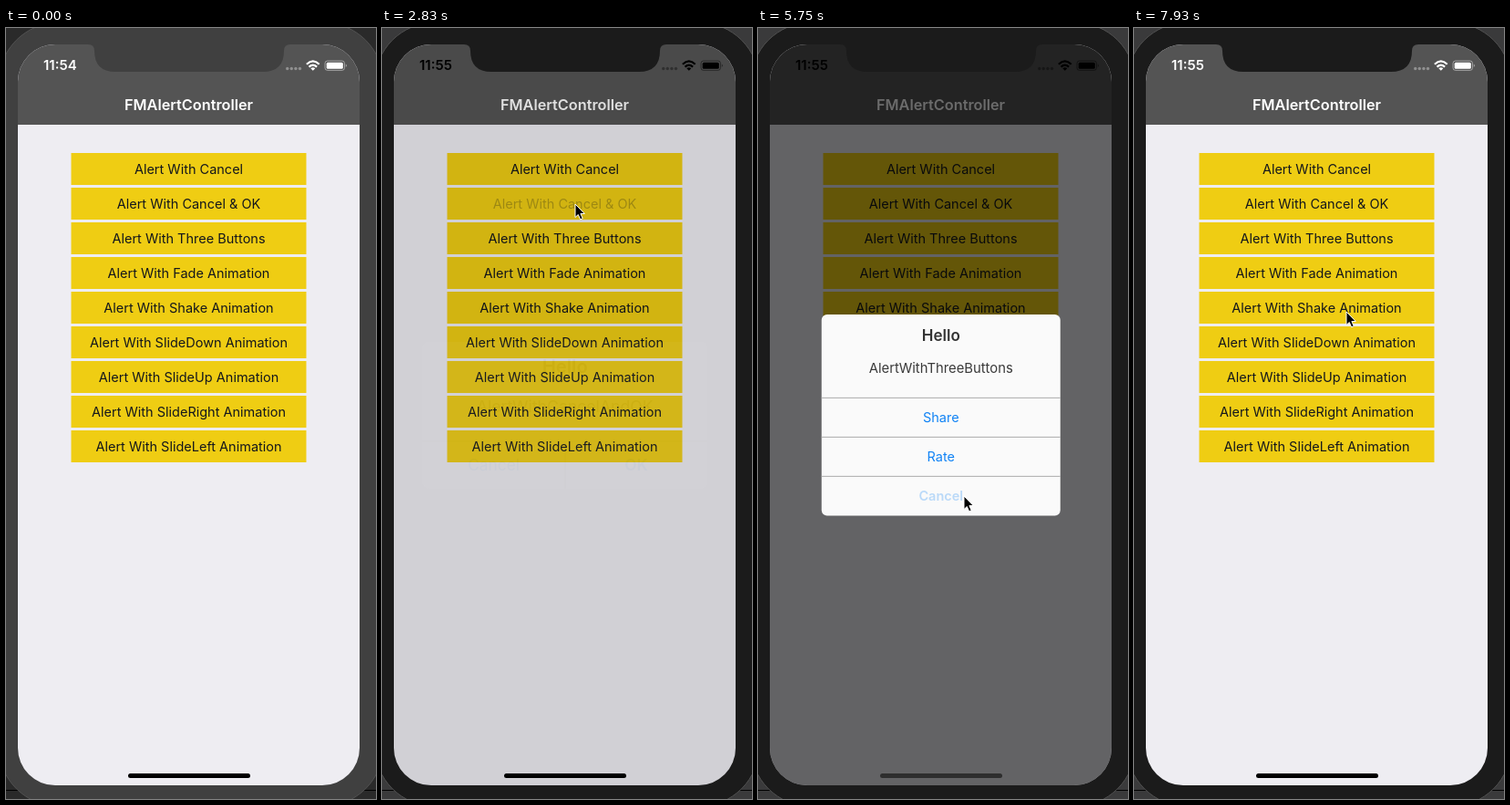
These frames come from a looping animation (406x845 px, 7.99 s). An HTML page:

```html
<!DOCTYPE html>
<html lang="en">
<head>
<meta charset="utf-8">
<title>FMAlertController</title>
<style>
  html, body { margin: 0; width: 100%; height: 100%; overflow: hidden; background: #2a2a2a; }
  svg { display: block; width: 406px; height: 845px; }
  text { font-family: Inter, Roboto, sans-serif; font-size: 14.5px; text-anchor: middle; }
  .bold { font-weight: 600; }
  .nav { font-size: 16.3px; fill: #fff; }
  .clock { font-size: 15px; text-anchor: start; }
  .title { font-size: 17px; fill: #333; }
  .message { font-size: 14.8px; fill: #3a3a3a; }
  .action { fill: #1183f5; }
</style>
</head>
<body>
<svg viewBox="0 0 406 845">
  <defs>
    <clipPath id="screen"><rect x="13" y="18" width="375" height="812" rx="41"/></clipPath>
  </defs>
  <rect id="desk" width="406" height="845"/>
  <path d="M0 835.5H406" stroke="#000"/>
  <rect id="bezel" x="-8" y="-6" width="422" height="859" rx="66" stroke="#505050"/>
  <g clip-path="url(#screen)">
    <rect x="13" y="18" width="375" height="812" fill="#eeedf2"/>
    <rect x="13" y="18" width="375" height="88" fill="#545454"/>
    <text class="nav bold" x="200.5" y="90">FMAlertController</text>
    <g id="rows"></g>
    <rect id="dim" x="13" y="18" width="375" height="812"/>
    <g id="alerts"></g>
    <rect id="home" x="134" y="817" width="134" height="5" rx="2.5"/>
  </g>
  <path id="notch" d="M90 17H312V18Q305 18 305 25Q305 48 282 48H120Q97 48 97 25Q97 18 90 18Z"/>
  <g id="status">
    <text id="clock" class="clock bold" x="41" y="46.3"></text>
    <g opacity=".35">
      <circle cx="308.7" cy="44.5" r="1.7"/><circle cx="313.3" cy="44.5" r="1.7"/>
      <circle cx="317.9" cy="44.5" r="1.7"/><circle cx="322.5" cy="44.5" r="1.7"/>
    </g>
    <g fill="none" stroke="currentColor" stroke-width="2.2">
      <path d="M329.9 39.7Q336.8 33.2 343.7 39.7"/>
      <path d="M332.5 42.6Q336.8 38.6 341.1 42.6"/>
    </g>
    <path d="M334.3 44.3Q336.8 42 339.3 44.3L336.8 46.8Z"/>
    <rect x="350" y="36" width="21.5" height="10.4" rx="2.8" fill="none" stroke="currentColor" opacity=".45"/>
    <rect x="351.7" y="37.7" width="18.1" height="7" rx="1.5"/>
    <path d="M372.8 39.5Q375 41.2 372.8 43Z" opacity=".5"/>
  </g>
  <path id="cursor" d="M0 0V14.5L3.3 11.5L5.6 16.8L8.2 15.7L5.9 10.5H10.3Z" stroke="#fff" stroke-width="1"/>
</svg>
<script>
const LOOP = 7990, CENTER_X = 200.75, CENTER_Y = 424.3, WIDTH = 262, MAX_DIM = 0.58;
const $ = id => document.getElementById(id);
const clamp = v => Math.min(1, Math.max(0, v));
const easeOut = v => 1 - (1 - clamp(v)) ** 2;
const smooth = v => v * v * (3 - 2 * v);

const labels = ['Cancel', 'Cancel &amp; OK', 'Three Buttons', 'Fade Animation', 'Shake Animation',
  'SlideDown Animation', 'SlideUp Animation', 'SlideRight Animation', 'SlideLeft Animation'];

// press: row goes down; open: alert starts; tap: action goes down; close: alert leaves
const alerts = [
  { message: 'AlertWithCancel', actions: ['Cancel'], pick: 0, press: 1240, open: 1300, tap: 2050, close: 2110, zoom: 0.2 },
  { message: 'AlertWithCancelAndOK', actions: ['Cancel', 'OK'], pick: 1, press: 2770, open: 2827, tap: 3800, close: 3865, zoom: 0.2 },
  { message: 'AlertWithThreeButtons', actions: ['Share', 'Rate', 'Cancel'], pick: 2, press: 4655, open: 4660, tap: 5700, close: 5760, zoom: 0.2 },
  { message: 'AlertWithFadeAnimation', actions: ['Cancel'], pick: 0, press: 6600, open: 6665, tap: 7300, close: 7360, zoom: 0 }
];

// time, x, y
const cursorPath = [
  [710, 388, 294], [1060, 231, 155], [1420, 231, 155], [1710, 233, 443], [1820, 233, 443], [1990, 232, 468],
  [2170, 232, 468], [2700, 212, 193], [3020, 212, 193], [3570, 236, 477],
  [3920, 236, 477], [4550, 228, 229], [4830, 228, 229], [5400, 226, 513],
  [5820, 226, 513], [6310, 233, 260], [6490, 233, 260], [6610, 235, 271],
  [6730, 235, 271], [7240, 234, 470], [7420, 234, 470], [7930, 233, 311]
];

function alertMarkup({ message, actions }) {
  const paired = actions.length === 2;
  const rowCount = paired ? 1 : actions.length;
  const height = 91.5 + 43 * rowCount;
  const left = CENTER_X - WIDTH / 2, top = CENTER_Y - height / 2;
  let body = `<rect x="${left}" y="${top}" width="${WIDTH}" height="${height}" rx="6" fill="#fafafa"/>
    <text class="title bold" x="${CENTER_X}" y="${top + 28.5}">Hello</text>
    <text class="message" x="${CENTER_X}" y="${top + 64.3}">${message}</text>`;
  for (let i = 0; i < rowCount; i++)
    body += `<path d="M${left} ${top + 91.3 + 43 * i}h${WIDTH}" stroke="#aaa"/>`;
  if (paired) body += `<path d="M${CENTER_X + .3} ${top + 91.3}v43.2" stroke="#aaa"/>`;
  actions.forEach((name, i) => {
    const x = CENTER_X + (paired ? (i - .5) * WIDTH / 2 : 0);
    const y = top + 118.3 + (paired ? 0 : 43 * i);
    const weight = i === actions.length - 1 ? 'bold' : '';
    body += `<text class="action ${weight}" x="${x}" y="${y}">${name}</text>`;
  });
  return `<g>${body}</g>`;
}

$('rows').innerHTML = labels.map((name, i) =>
  `<rect x="71.5" y="${137 + 38 * i}" width="258" height="35" fill="#efcd13"/>
   <text x="200.5" y="${160 + 38 * i}" fill="#14171c">Alert With ${name}</text>`).join('');
$('alerts').innerHTML = alerts.map(alertMarkup).join('');

const rowTexts = [...$('rows').querySelectorAll('text')];
alerts.forEach((alert, i) => {
  alert.node = $('alerts').children[i];
  alert.target = alert.node.querySelectorAll('.action')[alert.pick];
});

// Label opacity while held down, then fading back
const pressed = (t, down, up) => t < down ? 1 : t < up ? 0.27 : 0.27 + 0.73 * clamp((t - up) / 320);

function cursorAt(t) {
  const next = cursorPath.findIndex(key => key[0] > t);
  if (next < 1) return cursorPath[cursorPath.length - 1].slice(1);
  const [t0, x0, y0] = cursorPath[next - 1], [t1, x1, y1] = cursorPath[next];
  const k = smooth((t - t0) / (t1 - t0));
  return [x0 + (x1 - x0) * k, y0 + (y1 - y0) * k];
}

function draw(t) {
  let dim = 0, active = false;
  alerts.forEach((alert, i) => {
    const shown = easeOut((t - alert.open) / 250);
    const kept = 1 - easeOut((t - alert.close) / 250);
    const scale = 1 + alert.zoom * (1 - shown);
    alert.node.setAttribute('opacity', shown * kept);
    alert.node.setAttribute('transform',
      `translate(${CENTER_X} ${CENTER_Y}) scale(${scale}) translate(${-CENTER_X} ${-CENTER_Y})`);
    alert.target.setAttribute('opacity', pressed(t, alert.tap, alert.close));
    rowTexts[i].setAttribute('opacity', pressed(t, alert.press, alert.open + 10));
    dim = Math.max(dim, shown ** 0.45 * kept);
    active = active || (t >= alert.open && t < alert.close);
  });
  $('dim').setAttribute('opacity', MAX_DIM * dim);

  const tone = Math.round(46 * dim ** 4);
  $('home').setAttribute('fill', `rgb(${tone},${tone},${tone})`);
  const ink = active ? '#000' : '#fff';
  $('status').setAttribute('fill', ink);
  $('status').setAttribute('color', ink);
  $('clock').textContent = t < 830 ? '11:54' : '11:55';

  const focused = t >= 1240;
  const frame = focused ? '#1b1b1b' : '#404040';
  $('bezel').setAttribute('fill', frame);
  $('notch').setAttribute('fill', frame);
  $('desk').setAttribute('fill', focused ? '#3a3a3b' : '#2a2a2a');

  $('cursor').setAttribute('visibility', t < 710 ? 'hidden' : 'visible');
  $('cursor').setAttribute('transform', `translate(${cursorAt(t)})`);
}

const start = performance.now();
function tick() {
  draw((performance.now() - start) % LOOP);
  requestAnimationFrame(tick);
}
tick();
</script>
</body>
</html>
```
